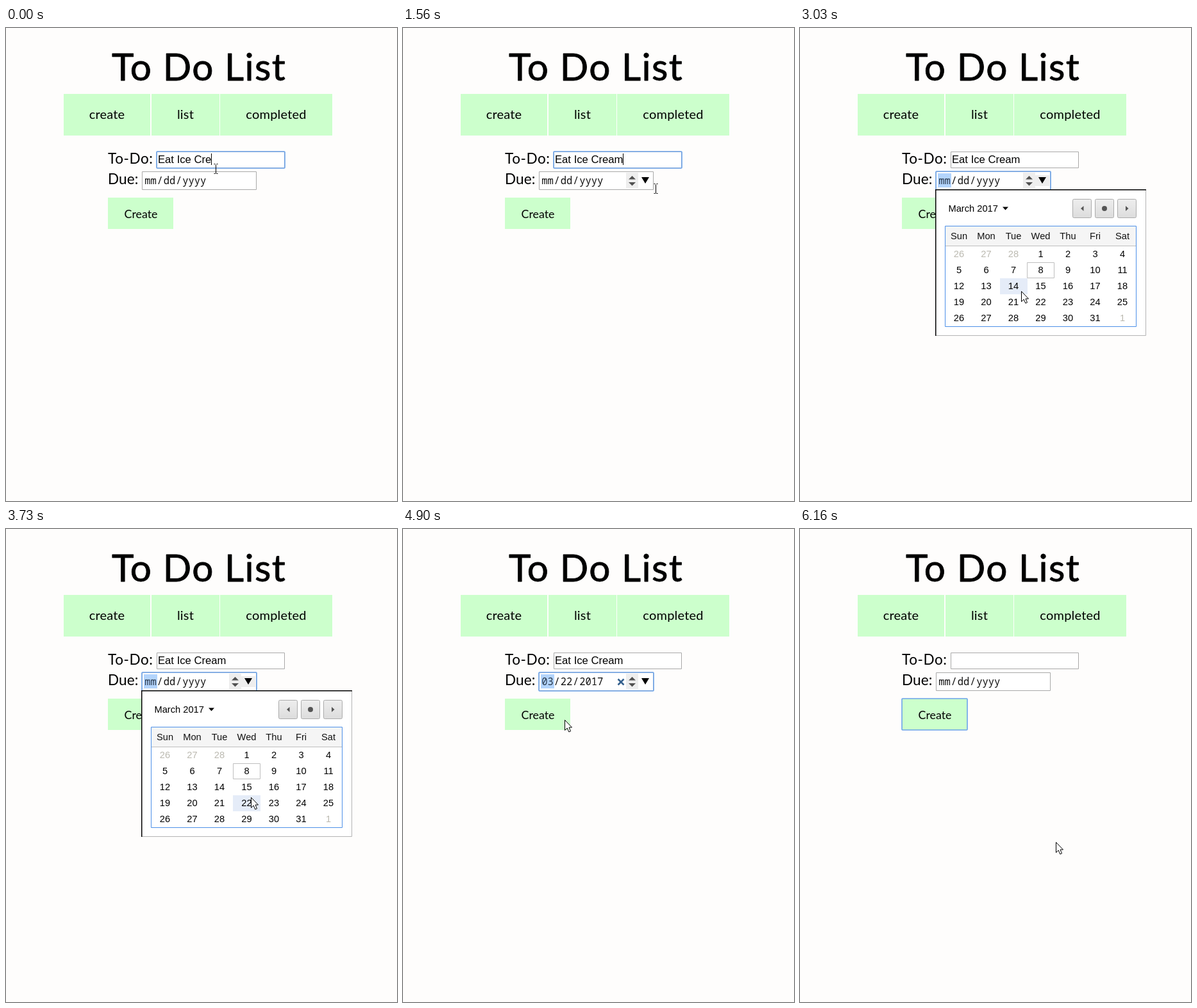
An HTML page with a canvas for the animation above (6.24 s loop, 610 by 739 pixels).

```html
<!DOCTYPE html>
<html lang="en">
<head>
<meta charset="utf-8">
<title>To Do List</title>
<style>
html, body { margin: 0; width: 100%; height: 100%; overflow: hidden; background: #fefdfc; }
canvas { display: block; }
</style>
</head>
<body>
<canvas id="stage" width="610" height="739"></canvas>
<script>
const ctx = document.getElementById('stage').getContext('2d');
const LOOP = 6240;
const GREEN = '#ccffcc', BLUE = '#6ba3ea', GREY = '#a9a9a9';
const SANS = '"Liberation Sans", Arial, sans-serif';
const ROUND = 'Lato, "Open Sans", sans-serif';
const MONO = '"Noto Sans Mono", monospace';

// Moments at which the form changes
const FOCUS_DATE = 1950, OPEN = 2170, PRESS_DAY = 4110, PICK = 4280, PRESS_CREATE = 5380, CLEAR = 5610;

// Pointer moves: first step, last step, number of steps, [progress, x, y] points
const MOVES = [
  [1010, 1240, 4, [0, 327, 220], [1, 404, 259]],
  [1420, 1950, 8, [0, 404, 259], [.375, 394, 251], [1, 381, 244]],
  [2340, 2950, 9, [0, 381, 244], [1, 345, 410]],
  [3030, 3030, 1, [0, 345, 410], [1, 345, 411]],
  [3350, 3960, 9, [0, 345, 411], [2 / 3, 382, 419], [1, 379, 422]],
  [4600, 5140, 8, [0, 379, 422], [.625, 252, 298], [1, 234, 295]],
  [5230, 5230, 1, [0, 234, 295], [1, 231, 295]],
  [6090, 6160, 2, [0, 231, 295], [1, 399, 489]]
];

function pointerAt(t) {
  const move = MOVES.filter(m => m[0] <= t).pop();
  if (!move) return { x: 327, y: 220 };
  const [start, end, steps, ...points] = move;
  const gap = (end - start) / (steps - 1) || 1;
  const k = Math.min(steps - 1, Math.floor((t - start) / gap + .2));
  const u = (k + 1) / steps;
  const i = Math.max(1, points.findIndex(p => p[0] >= u - 1e-6));
  const [a, b] = [points[i - 1], points[i]];
  let f = (u - a[0]) / (b[0] - a[0]);
  if (points.length === 2) f = f * f * (3 - 2 * f);
  return { x: Math.round(a[1] + (b[1] - a[1]) * f), y: Math.round(a[2] + (b[2] - a[2]) * f) };
}

function box(x, y, w, h, fill, line) {
  if (fill) { ctx.fillStyle = fill; ctx.fillRect(x, y, w, h); }
  if (line) {
    ctx.strokeStyle = line;
    ctx.lineWidth = 1;
    ctx.strokeRect(x + .5, y + .5, w - 1, h - 1);
  }
}

function ring(x, y, w, h) {
  ctx.strokeStyle = BLUE;
  ctx.lineWidth = 1.6;
  ctx.beginPath();
  ctx.roundRect(x, y, w, h, 1);
  ctx.stroke();
}

function text(str, x, y, size, family, align = 'left', color = '#000') {
  ctx.font = `${size}px ${family}`;
  ctx.textAlign = align;
  ctx.fillStyle = color;
  ctx.fillText(str, x, y);
}

function label(str, x, y, size, align = 'left', spacing = .2) {
  ctx.letterSpacing = spacing + 'px';
  text(str, x, y, size, ROUND, align);
  ctx.letterSpacing = '0px';
}

function shape(color, ...points) {
  ctx.fillStyle = color;
  ctx.beginPath();
  points.forEach(([x, y]) => ctx.lineTo(x, y));
  ctx.closePath();
  ctx.fill();
}

// Slightly heavier, round-cornered lettering
function drawTitle() {
  ctx.letterSpacing = '1.4px';
  text('To Do List', 301, 82, 58.5, ROUND, 'center');
  ctx.strokeStyle = '#000';
  ctx.lineJoin = 'round';
  ctx.lineWidth = .8;
  ctx.strokeText('To Do List', 301, 82);
  ctx.letterSpacing = '0px';
}

function drawPage() {
  box(0, 0, 610, 739, '#fefdfc');
  drawTitle();
  [['create', 90, 135], ['list', 227, 106], ['completed', 334, 175]].forEach(([name, x, w]) => {
    box(x, 103, w, 65, GREEN);
    label(name, x + w / 2, 142, 20, 'center');
  });
  label('To-Do:', 159, 212, 22.5, 'left', .6);
  label('Due:', 159, 244, 22.5, 'left', .1);
}

function drawTodo(t) {
  const value = t >= CLEAR ? '' : 'Eat Ice Cre' + (t >= 80 ? 'a' : '') + (t >= 230 ? 'm' : '');
  const focused = t < FOCUS_DATE;
  box(235, 193, 200, 26, '#fff', GREY);
  if (focused) ring(235, 193, 200, 26);
  text(value, 237, 211, 16.67, SANS);
  if (focused) box(Math.floor(237 + ctx.measureText(value).width), 196, 1, 18, '#000');
}

function drawDate(t, p) {
  const focused = t >= FOCUS_DATE && t < PRESS_CREATE;
  const filled = t >= PICK && t < CLEAR;
  const open = t >= OPEN && t < PICK;
  const hover = p.x >= 212 && p.x < 396 && p.y >= 224 && p.y < 254;
  box(212, 224, 179, 29, '#fff', GREY);
  if (focused) {
    ring(212, 224, 179, 29);
    box(215, 227, 21, 22, '#b3d4fc');
  }
  const parts = filled ? ['03', '/', '22', '/', '2017'] : ['mm', '/', 'dd', '/', 'yyyy'];
  [216.3, 235.6, 245.8, 265, 275.2].forEach((x, i) =>
    text(parts[i], x, 243.5, 15.5, MONO, 'left', i || !focused ? '#111' : '#28384c'));
  if (!focused && !hover) return;

  box(348, 226, 19, 24, '#eee');
  shape('#505050', [352, 236.5], [357.5, 231], [363, 236.5]);
  shape('#505050', [352, 241], [363, 241], [357.5, 246.5]);
  if (open || hover && p.x < 390 && p.x >= 367) box(367, 230, 22, 17, '#eee');
  shape('#000', [372, 233], [384, 233], [378, 243]);
  if (filled) {
    ctx.strokeStyle = '#35618e';
    ctx.lineWidth = 2.6;
    ctx.beginPath();
    ctx.moveTo(335.5, 234.5); ctx.lineTo(344.5, 243.5);
    ctx.moveTo(344.5, 234.5); ctx.lineTo(335.5, 243.5);
    ctx.stroke();
  }
}

function drawButton(t) {
  box(159, 265, 102, 49, GREEN);
  if (t >= PRESS_CREATE) ring(159, 265, 102, 49);
  label('Create', 210.5, 296.5, 17.8, 'center', 0);
}

function drawCalendar(t, p) {
  box(211, 252, 329, 229, '#fff', '#b4b4b4');
  box(211, 252, 329, 1.5, '#000');
  box(211, 252, 1.5, 229, '#000');
  text('March 2017', 231.5, 287, 14.67, SANS);
  shape('#000', [316, 279.5], [325, 279.5], [320.5, 284.5]);

  const face = ctx.createLinearGradient(0, 267, 0, 297);
  face.addColorStop(0, '#eee');
  face.addColorStop(1, '#dcdcdc');
  [425, 460, 495].forEach(x => {
    ctx.beginPath();
    ctx.roundRect(x + .5, 267.5, 29, 29, 2);
    ctx.fillStyle = face;
    ctx.fill();
    ctx.strokeStyle = '#ababab';
    ctx.lineWidth = 1;
    ctx.stroke();
  });
  shape('#555', [442.5, 278], [442.5, 286], [438, 282]);
  shape('#555', [508, 278], [508, 286], [512.5, 282]);
  ctx.beginPath();
  ctx.arc(475, 282, 4, 0, 7);
  ctx.fill();

  box(227, 310, 297, 30, '#f5f5f5');
  box(227, 340, 297, 1, '#bfbfbf');
  box(226, 309, 299, 158, null, '#4d90e8');
  'Sun Mon Tue Wed Thu Fri Sat'.split(' ').forEach((day, c) =>
    text(day, 248 + 42.5 * c, 330, 14.67, SANS, 'center', '#111'));

  const col = Math.floor((p.x - 227) / 42.5), row = Math.floor((p.y - 341) / 25);
  for (let i = 0; i < 35; i++) {
    const c = i % 7, r = Math.floor(i / 7), day = i - 2;
    const x = Math.floor(227 + 42.5 * c), y = 341 + 25 * r;
    const outside = day < 1 || day > 31;
    if (c === col && r === row) box(x, y, 43, 25, t >= PRESS_DAY ? '#bccdec' : '#e5ecf8');
    if (day === 8) box(x, y, 43, 25, null, '#bfbfbf');
    const number = day < 1 ? day + 28 : day > 31 ? day - 31 : day;
    text(number, 248 + 42.5 * c, y + 17, 14.67, SANS, 'center', outside ? '#bbb9b0' : '#000');
  }
}

function drawPointer({ x, y }) {
  const inTodo = x >= 235 && x < 435 && y >= 193 && y < 223;
  const inDate = x >= 212 && x < 396 && y >= 224 && y < 254 && (x < 367 || x >= 390);
  ctx.save();
  ctx.translate(x + .5, y + .5);
  ctx.strokeStyle = '#000';
  ctx.lineWidth = 1;
  ctx.lineJoin = 'miter';
  if (inTodo || inDate) {
    ctx.stroke(new Path2D('M-3-8H-1M1-8H3M-3 7H-1M1 7H3M0-7V7'));
  } else {
    const arrow = new Path2D('M0 0V16L3.7 12.5L6.3 18.5L9 17.4L6.5 11.5H11Z');
    ctx.fillStyle = '#fff';
    ctx.fill(arrow);
    ctx.stroke(arrow);
  }
  ctx.restore();
}

const origin = performance.now();
function draw() {
  const t = (performance.now() - origin) % LOOP;
  const p = pointerAt(t);
  drawPage();
  drawTodo(t);
  drawButton(t);
  drawDate(t, p);
  if (t >= OPEN && t < PICK) drawCalendar(t, p);
  drawPointer(p);
  requestAnimationFrame(draw);
}
draw();
</script>
</body>
</html>
```
